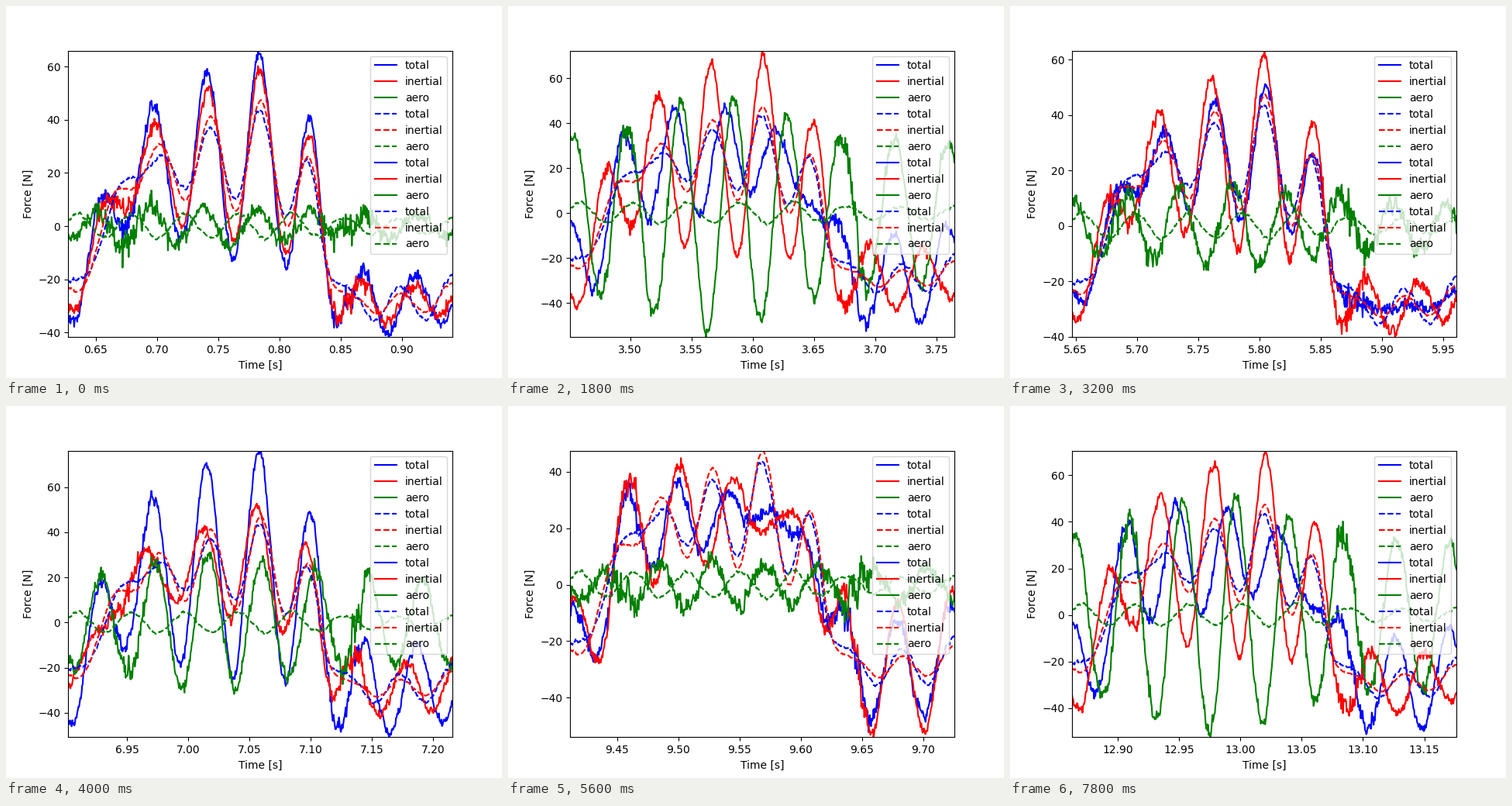
Recreate the animation shown at these times as a matplotlib script. Size 640 by 480 pixels, loop 8000 ms.

```python
import numpy as np
import matplotlib.pyplot as plt
from matplotlib.animation import FuncAnimation

FRAMES, INTERVAL = 40, 200
PERIOD = 0.31372            # seconds shown per frame
SPAN, FLAP = 496, 69        # window width and flap length in the same unit
N = 628
x = np.linspace(0, SPAN, N)


def wave(center, length=FLAP):
    return np.cos(2 * np.pi * (x - center) / length)


def bump(center, width):
    return np.exp(-((x / SPAN - center) / width) ** 2)


def step(center, width):
    return 1 / (1 + np.exp((center - x) / width))


def rough(rng, fine, coarse):
    slow = np.convolve(rng.normal(size=N + 4), np.ones(5) / 5, "valid")
    return fine * rng.normal(size=N) + coarse * slow


# Reference curves: a plateau with a growing oscillation, then a small wobble
plateau = (-29.5 + 51.5 * (step(43, 14) - step(325, 14)) + 4 * bump(0.46, 0.12)
           + 4 * bump(0, 0.02) + 4 * bump(1, 0.06))
swing = 22 * bump(0.52, 0.3) * (1 - step(335, 8)) * wave(183, 66)
wobble = 4 * step(378, 6) * wave(430, 66)
rng = np.random.default_rng(3)
ref_inertial = plateau + swing + wobble + rough(rng, 0.1, 0.5)
ref_aero = (-4.5 + 1.5 * step(330, 15)) * wave(185) + rough(rng, 0.1, 0.8)
dashed = [ref_inertial + ref_aero, ref_inertial, ref_aero]

# Frame: inertial gain and lag, aero gain and lag
KEYS = {
    0: (12, -4, 7, -5),
    5: (20, 1, -46, -3),
    12: (27, 1, -52, -3),
    20: (14, -17, 29, 1),
    28: (-30, 0, 8, 4),
    33: (13, -5, 19, 2),
    39: (23, 1, -49, -3),
}
table = np.array(list(KEYS.values()))
gains = table[:, ::2] * np.exp(-2j * np.pi * table[:, 1::2] / FLAP)

carrier = np.exp(2j * np.pi * (x - 180) / FLAP)
envelope = 0.65 + 0.4 * bump(0.38, 0.24)
shake = 1 + 0.9 * bump(0.15, 0.06) + 1.6 * bump(0.73, 0.05)


def forces(index):
    rng = np.random.default_rng(100 + index)
    inertial_gain, aero_gain = (np.interp(index, list(KEYS), g)
                                for g in gains.T)
    inertial = ref_inertial + envelope * (inertial_gain * carrier).real
    total = inertial + envelope * (aero_gain * carrier).real
    total = total + shake * rough(rng, 0.9, 1.8)
    inertial = inertial + shake * rough(rng, 0.9, 1.8)
    return [total, inertial, total - inertial]


fig, ax = plt.subplots(figsize=(6.4, 4.8), dpi=100)
COLORS = ["blue", "red", "green"]
NAMES = ["total", "inertial", "aero"]
lines = [ax.plot([], [], style, color=c, label=n)[0]
         for style in ("-", "--") for c, n in zip(COLORS, NAMES)]
ax.set_xlabel("Time [s]")
ax.set_ylabel("Force [N]")
ax.legend(handles=lines * 2, loc="upper right")


def update(index):
    start = (index + 2) * PERIOD
    curves = forces(index) + dashed
    for line, y in zip(lines, curves):
        line.set_data(start + x / SPAN * PERIOD, y)
    ax.set_xlim(start, start + PERIOD)
    ax.set_ylim(np.min(curves), np.max(curves))
    return lines


anim = FuncAnimation(fig, update, frames=FRAMES, interval=INTERVAL,
                     init_func=lambda: update(0), repeat=True,
                     repeat_delay=0, blit=False)
plt.show()
```
